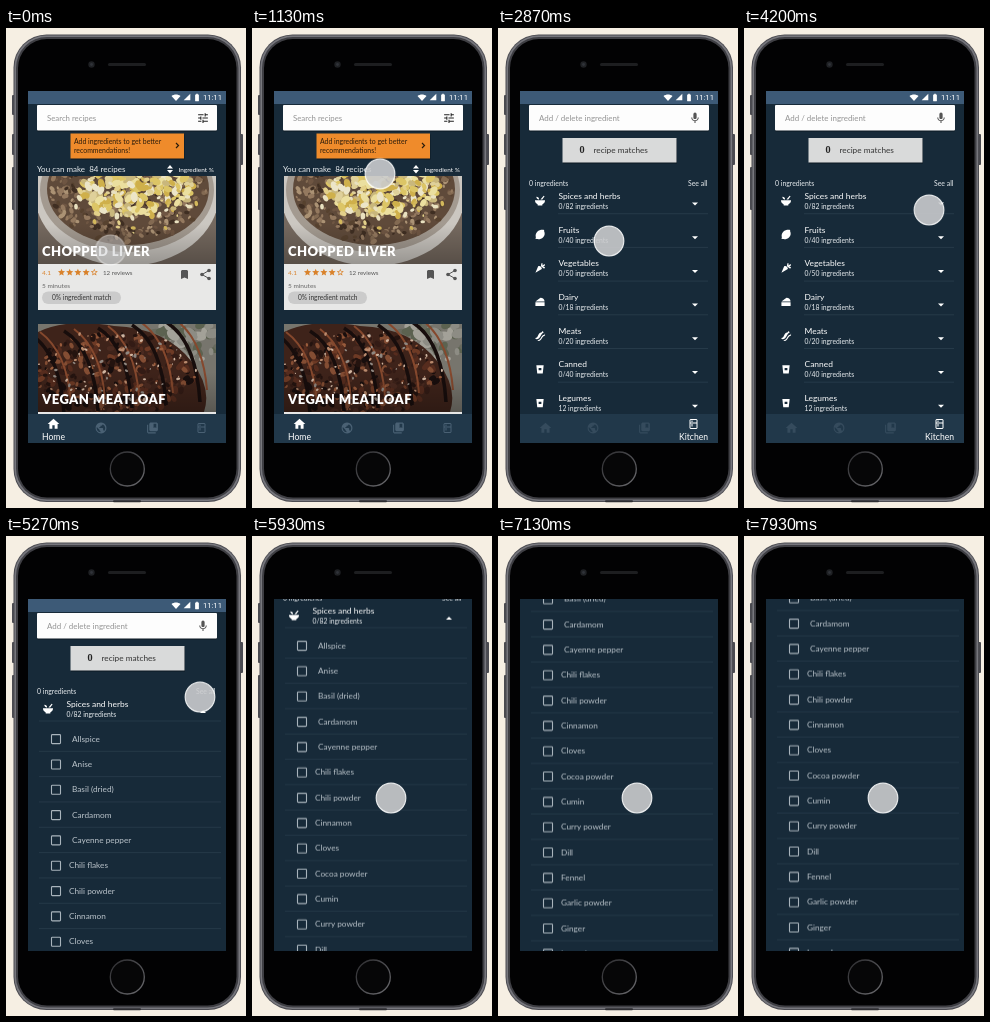
Write an HTML page that moves like this. It is 240 px wide and 480 px high and loops after 8 s.

```html
<!DOCTYPE html>
<html lang="en">
<head>
<meta charset="utf-8">
<title>Recipe app walkthrough</title>
<style>
  html, body { margin: 0; width: 100%; height: 100%; overflow: hidden; background: #f6efe3; }
  svg { display: block; width: 240px; height: 480px; font-family: Lato, "Open Sans", sans-serif; }
  text { white-space: pre; }
  #kitchen, #list, #scroll, #touch, #dot { animation: 8s linear infinite; }
  #kitchen { animation-name: openKitchen; }
  #list { animation-name: openList; }
  #scroll { animation-name: scroll; }
  #touch { animation-name: travel; }
  #dot { animation-name: press; }

  @keyframes openKitchen { 0%, 23.1% { opacity: 0; } 26.3%, 100% { opacity: 1; } }
  @keyframes openList { 0%, 56.3% { opacity: 0; } 60%, 100% { opacity: 1; } }
  @keyframes scroll {
    0%, 70.875% { transform: none; animation-timing-function: cubic-bezier(.22, 1, .36, 1); }
    96.6%, 100% { transform: translateY(-191.5px); }
  }
  @keyframes travel {
    0%, 7.5% { transform: translate(104.5px, 222px); animation-timing-function: ease-in; }
    14.125% { transform: translate(128px, 146px); animation-timing-function: ease-out; }
    18%, 28% { transform: translate(136px, 119px); animation-timing-function: ease-in-out; }
    35%, 40% { transform: translate(111px, 213px); animation-timing-function: ease-in-out; }
    52.5% { transform: translate(185px, 182px); }
    55%, 60% { transform: translate(191px, 176px); animation-timing-function: ease-in-out; }
    64%, 65.875% { transform: translate(194px, 161px); animation-timing-function: ease-in-out; }
    68.375%, 100% { transform: translate(139px, 262px); }
  }
  @keyframes press {
    0% { opacity: .5; transform: none; }
    3% { opacity: .9; }
    19.5% { transform: none; }
    21% { transform: scale(.85); }
    22.5%, 54.8% { transform: none; }
    55.8% { transform: scale(.85); }
    57% { transform: none; }
    100% { opacity: .9; transform: none; }
  }
</style>
</head>
<body>
<svg id="stage" viewBox="0 0 240 480"></svg>
<script>
const ICONS = {
  wifi: 'M12 21 0 8c7-5.5 17-5.5 24 0z',
  signal: 'M2 22h20V2z',
  battery: 'M16 4h-2V2h-4v2H8L7 5v16l1 1h8l1-1V5z',
  tune: 'M3 17v2h6v-2zM3 5v2h10V5zm10 16v-2h8v-2h-8v-2h-2v6zM7 9v2H3v2h4v2h2V9zm14 4v-2H11v2zm-6-4h2V7h4V5h-4V3h-2z',
  mic: 'M12 14c1.7 0 3-1.3 3-3V5a3 3 0 0 0-6 0v6c0 1.7 1.3 3 3 3zm5-3a5 5 0 0 1-10 0H5c0 3.4 2.7 6.2 6 6.7V21h2v-3.3c3.3-.5 6-3.3 6-6.7z',
  bookmark: 'M17 3H7L5 5v16l7-3 7 3V5z',
  star: 'M12 17.3 18.2 21l-1.6-7L22 9.2l-7.2-.6L12 2 9.2 8.6 2 9.2 7.5 14l-1.7 7z',
  emptyStar: 'M12 17.3 18.2 21l-1.6-7L22 9.2l-7.2-.6L12 2 9.2 8.6 2 9.2 7.5 14l-1.7 7zM12 15l-3.5 2 1-4-3-2.5 4-.5L12 6.5l1.5 3.5 4 .5-3 2.5 1 4z',
  home: 'M10 20v-6h4v6h5v-8h3L12 3 2 12h3v8z',
  globe: 'M12 2a10 10 0 1 0 .1 0zm-1 18a8 8 0 0 1-6.8-10l4.8 5v1l2 2zm7-2.5c-.5-1-1-1.5-2-1.5v-3l-1-1H9v-2h2V8h2l2-2V5a8 8 0 0 1 3 12.5z',
  book: 'M22 16V4l-2-2H8L6 4v12l2 2h12zM2 6v14l2 2h14v-2H4V6zM14 4h5v8l-2.5-1.5L14 12z',
  fridge: 'M18 2H6L4 4v16l2 2h12l2-2V4zm0 18H6v-9h12zm0-11H6V4h12zM8 5h2v3H8zm0 7h2v5H8z',
  mortar: 'M1 11h22c0 4-2 7-6 9v2H7v-2c-4-2-6-5-6-9zM9 9C5 8 4 5 4 3c4 0 6 2 6 6zm4 0 7-8 2 1-5 7z',
  lemon: 'M21 2c-5-1-11 0-15 4-4 4-4 9-3 12l-1 3 3 1c5 1 10 0 14-4 4-4 4-9 2-13z',
  carrot: 'M2 22 8 8c3-3 9 2 8 6zM14 8l1-7 3 1-1 4 5-3 1 3-4 2 4 2-2 3z',
  cake: 'M2 11 13 3c5 0 9 3 9 8zM2 13h20v8H2z',
  bacon: 'M1 17c8 1 5-11 14-12l3-3 2 3C12 9 15 18 4 20zm5 5c9 0 7-11 16-12l1-3v5c-8 2-6 11-14 12z',
  can: 'M4 3h16l-2 18H6zm5 6v5h6V9z'
};
const INK = '#172a39';
const mix = (n, f) => Array.from({ length: n }, (_, i) => f(i)).join('');
const rect = (x, y, w, h, fill, r = 0, more = '') =>
  `<rect x="${x}" y="${y}" width="${w}" height="${h}" fill="${fill}" rx="${r}" ${more}/>`;
const oval = (x, y, rx, ry, fill, more = '') =>
  `<ellipse cx="${x}" cy="${y}" rx="${rx}" ry="${ry}" fill="${fill}" ${more}/>`;
const text = (x, y, size, s, fill = '#e9edf0', more = '') =>
  `<text x="${x}" y="${y}" font-size="${size}" fill="${fill}" ${more}>${s}</text>`;
const path = (d, fill, more = '') => `<path d="${d}" fill="${fill}" ${more}/>`;
const stroke = (d, color, w = 1) => path(d, 'none', `stroke="${color}" stroke-width="${w}"`);
const icon = (name, cx, cy, size, fill) =>
  path(ICONS[name], fill, `fill-rule="evenodd" transform="translate(${cx - size / 2} ${cy - size / 2}) scale(${size / 24})"`);
const caret = (x, y, h = 3) => path(`M${x - 3} ${y}h6l-3 ${h}z`, '#fff');

let seed = 7;
const rnd = () => (seed = (seed * 16807) % 2147483647) / 2147483647;

// Scatter small tilted ovals over an elliptical patch
const crumbs = (n, x, y, rx, ry, size, colors) => mix(n, () => {
  const a = rnd() * 6.283, d = Math.sqrt(rnd()), s = size * (.5 + rnd());
  const cx = (x + Math.cos(a) * d * rx).toFixed(1), cy = (y + Math.sin(a) * d * ry).toFixed(1);
  return oval(cx, cy, s, s * .65, colors[Math.floor(rnd() * colors.length)],
    `transform="rotate(${Math.floor(rnd() * 180)} ${cx} ${cy})"`);
});

const photo = (id, y, body) => `<clipPath id="${id}">${rect(32, y, 178, 88)}</clipPath>
  <g clip-path="url(#${id})">${body}${rect(32, y + 48, 178, 40, 'url(#shade)')}</g>`;

const liver = () => rect(32, 148, 178, 88, '#75695f') +
  oval(121, 166, 92, 72, '#cbc7c1') + oval(121, 162, 87, 62, '#a39a90') + oval(122, 161, 81, 56, '#5f4a3a') +
  crumbs(520, 122, 163, 78, 51, 2.5, ['#3f2e22', '#6f5643', '#94795f', '#57422f', '#836a52', '#ab9274']) +
  crumbs(230, 130, 161, 57, 27, 4, ['#dcc566', '#ebdf9f', '#cfb04b', '#ece5c8', '#dfd09a', '#c9b77c']) +
  crumbs(35, 125, 178, 68, 28, 2.5, ['#e3d08a', '#d3b85c', '#e9e1c0']);

const meatloaf = () => rect(32, 296, 178, 88, '#77756d') +
  crumbs(60, 185, 312, 42, 22, 5, ['#8d8c84', '#5c6250', '#a3a198', '#686a5e']) +
  path('M32 304Q60 290 108 298Q160 300 186 334Q206 360 198 384H32z', '#3e231a') +
  crumbs(330, 108, 346, 78, 42, 3, ['#24130f', '#6d3a25', '#834d33', '#331b15', '#562c1e', '#180e0d', '#4a2a20']) +
  mix(5, i => stroke(`M${24 + i * 34} ${306 - i * 3}q30 18 34 80`, '#170d0c', 3.5) +
    stroke(`M${34 + i * 34} ${304 - i * 3}q27 20 31 70`, '#85482d', 2)) +
  crumbs(110, 108, 342, 82, 40, 1.5, ['#b98a6d', '#d0b5a0', '#9a5c3c', '#8f8780']);

const statusBar = () => rect(22, 63, 198, 13, '#3d5a77') +
  icon('wifi', 170, 69.5, 9, '#fff') + icon('signal', 181, 69, 8, '#fff') + icon('battery', 191, 69.5, 9, '#fff') +
  text(197, 72.3, 7.6, '11:11', '#fff', 'font-family="Roboto, sans-serif"');

const searchBox = (label, name, size) => rect(31, 77.5, 180, 26, '#0d1822', 1) + rect(31, 77, 180, 25.5, '#fdfdfd', 1) +
  text(41, 92.7, size, label, '#949494') + icon(name, 197, 90, 13, name === 'tune' ? '#222' : '#555');

const tabs = kitchen => {
  const dim = kitchen ? '#354b5d' : '#4a6174';
  return rect(22, 386, 198, 29, '#21384a') +
    icon('home', 47.5, kitchen ? 400 : 396, 14, kitchen ? dim : '#fff') +
    icon('globe', 95, 400, 13, dim) + icon('book', 146.5, 400, 13, dim) +
    icon('fridge', 195.5, kitchen ? 396 : 400, 12, kitchen ? '#fff' : dim) +
    (kitchen ? text(195.5, 411.5, 8.6, 'Kitchen', '#fff', 'text-anchor="middle"')
             : text(47.5, 411.5, 8.6, 'Home', '#fff', 'text-anchor="middle"'));
};

const title = (y, s) => text(36, y, 13, s, '#fff', 'font-weight="900" letter-spacing=".45"');

const home = () => rect(22, 63, 198, 352, INK) + statusBar() + searchBox('Search recipes', 'tune', 7.8) +
  rect(65, 106.5, 113.5, 25, '#0d1822') + rect(64.5, 105.5, 113.5, 25, '#ef8b2b') +
  text(68, 116.2, 6.9, 'Add ingredients to get better', '#2b1c0c') + text(68, 124.7, 6.9, 'recommendations!', '#2b1c0c') +
  stroke('M170 115l2.5 2.5-2.5 2.5', '#2b1c0c', 1.2) +
  text(31, 144, 8, 'You can make  84 recipes') +
  path('M161 140.5h6l-3-3.5zM161 142h6l-3 3.5z', '#fff') + text(172.5, 143.6, 6.4, 'Ingredient %', '#fff') +
  photo('top', 148, liver()) + rect(32, 236, 178, 46, '#e8e8e7') + title(227.5, 'CHOPPED LIVER') +
  text(36, 246.7, 6.5, '4.1', '#d9822b') +
  mix(5, i => icon(i < 4 ? 'star' : 'emptyStar', 55.5 + i * 8.2, 244.3, 8.5, '#d9822b')) +
  text(97, 246.7, 6.2, '12 reviews', '#555') +
  icon('bookmark', 178.5, 246.5, 12, '#555') +
  stroke('M203 242.5l-7 4 7 4', '#555', 1) +
  oval(203, 242.5, 1.8, 1.8, '#555') + oval(196, 246.5, 1.8, 1.8, '#555') + oval(203, 250.5, 1.8, 1.8, '#555') +
  text(36, 259.5, 6.5, '5 minutes', '#666') +
  rect(36, 263.5, 79, 12.5, '#cbcbcb', 6.2) + text(46, 272, 6.6, '0% ingredient match', '#333') +
  photo('low', 296, meatloaf()) + rect(32, 384, 178, 2, '#e8e8e7') + title(375.5, 'VEGAN MEATLOAF') +
  tabs(false);

const kitchenHead = () => statusBar() + searchBox('Add / delete ingredient', 'mic', 7.95) +
  rect(65, 111, 114, 24.5, '#0d1822') + rect(64.5, 110, 114, 24.5, '#d9dada') +
  text(81.5, 125.2, 9, '0', '#222', 'font-family="Noto Serif, serif" font-weight="700"') +
  text(95.5, 124.8, 8.25, 'recipe matches', '#333') +
  text(31, 158, 6.9, '0 ingredients') + text(190, 158, 6.9, 'See all');

const group = (i, name, total, glyph) => {
  const y = 168 + i * 33.7;
  return icon(glyph, 42, y + 4.8, 11, '#fff') + text(60.5, y + 2.8, 8.45, name, '#fff') +
    text(60.5, y + 12.9, 6.8, `0/${total} ingredients`);
};

const GROUPS = [['Spices and herbs', 82, 'mortar'], ['Fruits', 40, 'lemon'], ['Vegetables', 50, 'carrot'],
  ['Dairy', 18, 'cake'], ['Meats', 20, 'bacon'], ['Canned', 40, 'can']];

const kitchen = () => rect(22, 63, 198, 352, INK) + kitchenHead() +
  GROUPS.map((g, i) => group(i, ...g) + caret(197, 174.5 + i * 33.7) +
    stroke(`M60 ${185.7 + i * 33.7}h150`, '#2a3e4d', .8)).join('') +
  icon('can', 42, 375, 11, '#fff') + text(60.5, 373, 8.45, 'Legumes', '#fff') +
  text(60.5, 383.1, 6.8, '12 ingredients') + caret(197, 376.7) + tabs(true);

const SPICES = ['Allspice', 'Anise', 'Basil (dried)', 'Cardamom', 'Cayenne pepper', 'Chili flakes', 'Chili powder',
  'Cinnamon', 'Cloves', 'Cocoa powder', 'Cumin', 'Curry powder', 'Dill', 'Fennel', 'Garlic powder', 'Ginger', 'Lavender'];

const spice = (name, i) => {
  const y = 203 + i * 25.33;
  return rect(45.5, y - 4.4, 9, 9, 'none', .8, 'stroke="#a9b4bc" stroke-width="1.1"') +
    text(i < 5 ? 66 : 63, y + 2.6, 8.25, name, '#bcc5cc') + stroke(`M33 ${y + 12.3}h182`, '#2a3e4d', .8);
};

const list = () => rect(22, 63, 198, 352, INK) + `<g id="scroll">${kitchenHead()}${group(0, ...GROUPS[0])}` +
  caret(197, 177, -3) + stroke('M33 185h182', '#2a3e4d', .8) + SPICES.map(spice).join('') + '</g>';

const phone = () => rect(0, 0, 240, 480, '#f6efe3') +
  [[67, 20], [106, 21], [139, 22], [149, 33]].map(([y, h]) => rect(6, y, 3, h, '#4a4a50', 1)).join('') +
  rect(232, 106, 5, 31, '#4a4a50', 1) +
  rect(7.5, 6.5, 227.5, 467.5, '#4d4d53', 33) + rect(8.5, 7.5, 225.5, 465.5, '#77777d', 32) +
  rect(10, 9, 222.5, 462.5, '#3f3f44', 31) + rect(12, 11, 218.5, 458.5, '#020203', 29) +
  rect(107, 472.3, 28, 2, '#2d2d31', 1) +
  oval(85.5, 36.5, 3.2, 3.2, '#1f2124') + oval(85.5, 36.5, 1.4, 1.4, '#303339') +
  rect(102, 35, 38, 3, '#1d1e20', 1.5) +
  oval(121.3, 441, 17, 17, '#060607', 'stroke="url(#ring)" stroke-width="1.3"');

document.getElementById('stage').innerHTML = `<defs>
  <linearGradient id="shade" x2="0" y2="1"><stop stop-opacity="0"/><stop offset="1" stop-opacity=".25"/></linearGradient>
  <linearGradient id="ring" x2="1" y2="1"><stop stop-color="#2c2c2f"/><stop offset="1" stop-color="#6c6c70"/></linearGradient>
  <clipPath id="screen">${rect(22, 63, 198, 352)}</clipPath></defs>
  ${phone()}
  <g clip-path="url(#screen)"><g>${home()}</g><g id="kitchen">${kitchen()}</g><g id="list">${list()}</g></g>
  <g id="touch"><circle id="dot" r="14.8" fill="#cbccce" stroke="#fff" stroke-width="1.2"/></g>`;
</script>
</body>
</html>
```
